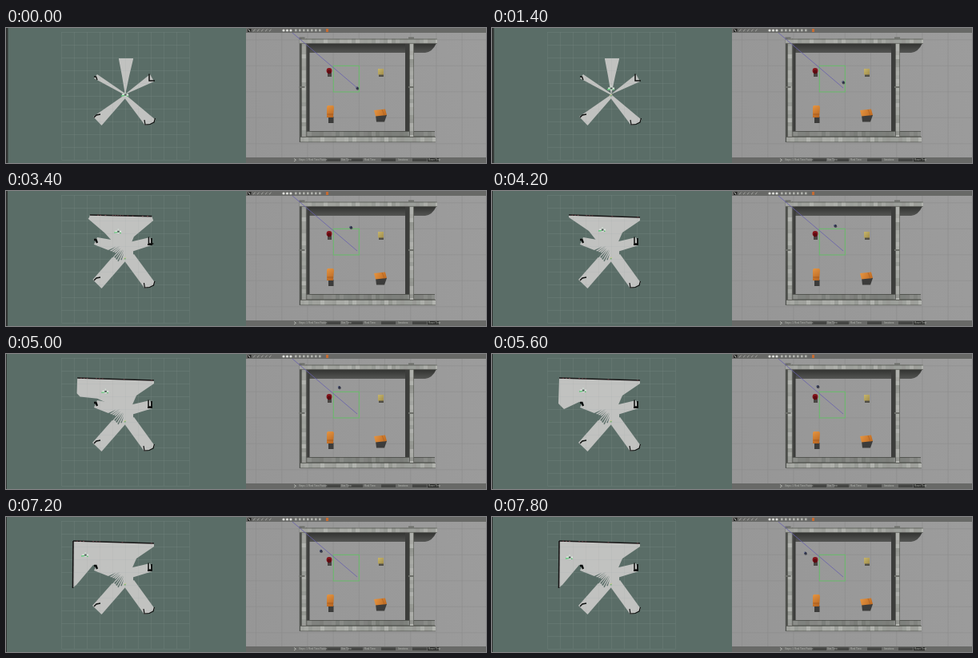
An HTML page with a canvas for the animation above (8000 ms loop, 600 by 169 pixels).

```html
<!DOCTYPE html>
<html>
<head>
<meta charset="utf-8">
<style>
html, body { margin: 0; width: 100%; height: 100%; overflow: hidden; background: #5b6d67; }
canvas { display: block; width: 600px; height: 169px; }
</style>
</head>
<body>
<canvas id="stage" width="600" height="169"></canvas>
<script>
const ctx = document.getElementById('stage').getContext('2d');
const LOOP = 8000, STEP = 200;
const FREE = '#c1c2c0', UNKNOWN = '#5a6d67', INK = '#0c0e0d';

const ramp = (t, from, to) => Math.min(1, Math.max(0, (t - from) / (to - from)));

// Progress of each leg of the drive: start, up, left turn, left, corner, down.
function legs(t) {
  return {
    s: ramp(t, 600, 1400), a: ramp(t, 1400, 2400), b: ramp(t, 2400, 4200),
    c: ramp(t, 4200, 5600), d: ramp(t, 5600, 6400), e: ramp(t, 6400, 7800)
  };
}

// Robot offset from its start, in map pixels.
function drive({ s, a, b, c, d, e }) {
  return {
    dx: -6 * a - 5 * b - 24 * c - 12 * d - 5 * e,
    dy: -8 * s - 22 * a - 5 * b - 3 * c - 2 * d + 7 * e
  };
}

function rect(x, y, w, h, color) {
  ctx.fillStyle = color;
  ctx.fillRect(x, y, w, h);
}

function trace(p) {
  ctx.beginPath();
  for (let i = 0; i < p.length; i += 2) ctx.lineTo(p[i], p[i + 1]);
}

function poly(p, color) {
  trace(p);
  ctx.fillStyle = color;
  ctx.fill();
}

function line(p, color, width = 1) {
  trace(p);
  ctx.strokeStyle = color;
  ctx.lineWidth = width;
  ctx.stroke();
}

function disc(x, y, r, color) {
  ctx.beginPath();
  ctx.arc(x, y, r, 0, Math.PI * 2);
  ctx.fillStyle = color;
  ctx.fill();
}

function shade(x0, y0, x1, y1, from, to) {
  const g = ctx.createLinearGradient(x0, y0, x1, y1);
  g.addColorStop(0, from);
  g.addColorStop(1, to);
  return g;
}

function noise(i) {
  const v = Math.sin(i * 12.9898 + 4.1) * 43758.5453;
  return v - Math.floor(v);
}

function mapGrid(color) {
  for (let d = 0; d <= 160; d += 16) {
    line([69.5 + d, 5, 69.5 + d, 165], color, 0.7);
    line([69.5, 5.5 + d, 229.5, 5.5 + d], color, 0.7);
  }
}

// The five first beams; the side beams widen towards the hub by k.
function beams(k, b) {
  const fill = (...p) => poly(p, FREE);
  fill(149 - 11 * k, 84 - 6 * k, 110, 63 + 4 * k, 114, 58, 149, 82 - 18 * k);
  fill(149 + 8 * k, 83 - 7 * k, 185 - 2 * k, 67 + b, 180, 58, 150, 82 - 17 * k);
  fill(148 - 10 * k, 84 - 7 * k, 109 - b, 111, 119.5, 122, 150, 87);
  fill(150 + 10 * k, 84 - 5 * k, 187 - b, 115, 184 - b, 119, 174 - b, 122, 147, 86);
  if (k) fill(149 - 13 * k, 82 - 19 * k, 149 + 10 * k, 82 - 17 * k, 159, 80, 149, 87, 139, 80);
}

// Unseen slivers left between beams, fanned about a point on the path.
function slivers(k) {
  ctx.globalAlpha = k;
  for (let i = 0; i < 8; i++) {
    const a = 1.95 + i * 0.1, w = 0.018 + noise(i) * 0.022;
    const near = 12 + noise(i + 9) * 8, far = 27 + noise(i + 20) * 10;
    const at = (r, q) => [154 + Math.cos(q) * r, 61 + Math.sin(q) * r];
    poly([...at(near, a), ...at(far, a - w), ...at(far, a + w)], UNKNOWN);
  }
  ctx.globalAlpha = 1;
}

function obstacles(k, b) {
  line([110, 61, 112.5, 61, 114, 65], INK, 1.4 + k);
  line([179 - b, 57.5, 179 - b, 66, 186 - 3 * b, 66], INK, 1.5);
  if (k) line([177, 67, 182, 67, 182, 59], INK, 1.8 * k);
  line([110, 112, 113, 109, 118, 108], INK, 1.4);
  line([173 - b, 115, 174 - b, 121, 180 - b, 120.5, 185 - b, 118, 186.5 - b, 113], INK, 1.2);
}

function drawMap(t) {
  const leg = legs(t), { a, b, c, d } = leg;
  rect(0, 0, 300, 169, UNKNOWN);
  rect(0, 0, 2.5 + a - 2.5 * b, 169, '#303332');
  mapGrid('rgba(125,145,137,.3)');

  const left = 141 - 25 * a - 20 * b - 12 * c, right = 159 + 20 * a + 6 * b;
  const top = 38 - 8 * a, slope = 3 * b, low = 38 - 4 * a - 2 * b + 30 * c + 27 * d;
  beams(a, b);
  poly([
    left, top, right, top + slope,
    159 + 24 * a + 2 * b, 39 - 2 * a,
    154 + 2 * a + 7 * b, 60 + 4 * a - 12 * b,
    149, 84,
    147 - 11 * a - 4 * b, 72 - 8 * a,
    145 - 18 * a - 6 * b - 12 * c, 60 - 4 * a - 6 * b + 10 * c,
    141 - 30 * a - 15 * b - 6 * c - 2 * d, 39 - 2 * a - 4 * b + 36 * c + 16 * d,
    141 - 27 * a - 18 * b - 13 * c, low
  ], FREE);
  slivers(a);
  mapGrid('rgba(130,145,138,.1)');
  obstacles(a, b);

  if (a > 0) {
    line([left, top, right, top + slope], '#171515', 1.6);
    for (let k = 0; k < 1; k += 0.04)
      if (noise(k * 25 + b) > 0.6)
        rect(left + (right - left) * k, top + slope * k - 0.4, 1.8, 0.9, '#71464b');
  }
  if (d > 0) line([left, top, 83.5, low], '#151313', 1.6);

  const { dx, dy } = drive(leg), x = 149 + dx, y = 84 + dy;
  line([147, 85, 150, 83], '#c9c994', 1.2);
  rect(148, 84, 1.5, 1.5, '#6fae78');
  rect(x - 4, y - 1.5, 8, 3, '#e0e7e1');
  line([x - 5, y + 1, x - 1, y + 0.5], '#62c77a', 1.3);
  line([x, y - 4, x, y + 2], '#d9eee0', 0.8);
  rect(x - 1, y - 1.5, 2.5, 2.2, '#4d5c56');
  rect(x + 2, y + 0.5, 1.5, 1.5, '#54b868');
}

// Concrete strip with soft stains and dark rims.
function concrete(x, y, w, h, color = '#b2b4af') {
  rect(x, y, w, h, color);
  const wide = w > h, length = Math.max(w, h);
  for (let i = 0; i * 5 < length - 5; i++) {
    const tint = `rgba(70,73,68,${noise(i + x) * 0.28})`, at = i * 5;
    if (wide) rect(x + at, y, 5, h, tint);
    else rect(x, y + at, w, 5, tint);
  }
  const rim = 'rgba(55,57,53,.6)';
  if (wide) { rect(x, y, w, 1, rim); rect(x, y + h - 0.6, w, 0.8, rim); }
  else { rect(x, y, 1, h, rim); rect(x + w - 0.6, y, 0.8, h, rim); }
}

function drawWalls() {
  ctx.beginPath();
  ctx.moveTo(374, 19);
  ctx.lineTo(538, 19);
  ctx.quadraticCurveTo(533, 30, 524, 31);
  ctx.lineTo(378, 31);
  ctx.fillStyle = shade(0, 19, 0, 31, '#30312f', '#545553');
  ctx.fill();
  rect(375, 19, 4.5, 112, shade(375, 0, 380, 0, '#4b4c4a', '#333432'));
  rect(499, 19, 5, 113, '#3c3d3b');
  concrete(372, 129, 164, 7, '#8b8d89');
  rect(366.8, 12, 2.4, 131, '#4e504c');
  concrete(369, 13, 6.5, 130);
  concrete(504, 14, 5.8, 124);
  concrete(367, 13.5, 172, 6);
  concrete(368, 136, 169, 7);
  for (const x of [366.5, 503]) for (const y of [11.5, 73]) rect(x, y, 7, 2, '#6d6f6a');
}

function drawObjects() {
  rect(402, 55, 5, 6, '#4a4644');
  disc(404, 53.5, 3.4, '#85141b');
  disc(404, 55, 2.4, '#5c0b11');
  rect(466, 58, 6, 3, '#514f47');
  rect(465, 51, 7, 7.5, shade(465, 51, 472, 58, '#c7b66c', '#a28f4d'));
  rect(403, 111, 6.5, 8, '#3c3c3b');
  poly([402, 97, 409, 97, 410, 99, 409, 112, 401, 112, 401, 99],
    shade(401, 97, 410, 112, '#e59643', '#b4611d'));
  line([401.5, 108, 409, 108], '#9e541a', 0.8);
  poly([462, 109, 476, 109, 473, 117.5, 463, 117.5], '#3c3c3b');
  poly([460, 103, 474, 101.5, 476, 109, 462, 110.5], shade(460, 102, 476, 110, '#e69643', '#bd681f'));
  line([470, 102, 473, 109.5], '#ad6426', 0.8);
}

function drawBars() {
  const bar = '#686967', icon = '#b0b2ac';
  rect(300, 0, 300, 6, bar);
  rect(302, 1, 4.5, 4, '#242523');
  line([303, 1.5, 305, 4.5], '#d2d3d0', 1);
  for (let i = 0; i < 5; i++) line([309 + i * 5, 4.2, 311.5 + i * 5, 1.8], icon, 0.9);
  for (let i = 0; i < 3; i++) disc(347 + i * 4.5, 3, 1.6, '#dcddd9');
  for (let i = 0; i < 7; i++) rect(361 + i * 5, 1.5, 2.6, 2.8, icon);
  rect(400, 1, 3, 4, '#c66b32');

  rect(300, 162, 300, 7, bar);
  line([360, 163.5, 362.5, 165.2, 360, 167], '#c5c6c1', 0.8);
  for (const x of [400, 428, 469, 508]) rect(x, 163.3, 18, 3.7, '#444543');
  rect(527, 163, 14, 4.2, '#2a2b29');
  ctx.font = '3px "Liberation Sans", sans-serif';
  ctx.fillStyle = '#b8bab5';
  const label = (text, x) => ctx.fillText(text, x, 166.2);
  label('Steps: 1', 366);
  label('Real Time Factor:', 378);
  label('Sim Time:', 419);
  label('Real Time:', 448);
  label('Iterations:', 490);
  label('Reset Time', 528);
}

function drawSim(t) {
  rect(300, 0, 300, 169, shade(300, 160, 600, 10, '#969696', '#9c9c9c'));
  for (let x = 312.5; x < 600; x += 32.2) line([x, 6, x, 162], '#8b8b8b', 0.6);
  for (let y = 14.8; y < 162; y += 32.5) line([300, y, 600, y], '#8b8b8b', 0.6);
  drawWalls();
  ctx.strokeStyle = '#65c267';
  ctx.lineWidth = 0.9;
  ctx.strokeRect(409.3, 47.3, 32, 32.7);
  line([358, 6, 439, 75], '#6760ae', 0.8);
  drawObjects();
  const { dx, dy } = drive(legs(t));
  const x = 439 + dx * 0.91, y = 75 + dy * 0.91;
  disc(x + 0.5, y + 1, 1.8, '#4c4d56');
  disc(x, y, 1.5, '#292d43');
  rect(x - 1.7, y - 1.2, 1.4, 1.3, '#687196');
  drawBars();
}

function frame(now) {
  const t = Math.floor((now % LOOP) / STEP) * STEP;
  drawMap(t);
  drawSim(t);
  requestAnimationFrame(frame);
}
frame(0);
</script>
</body>
</html>
```
